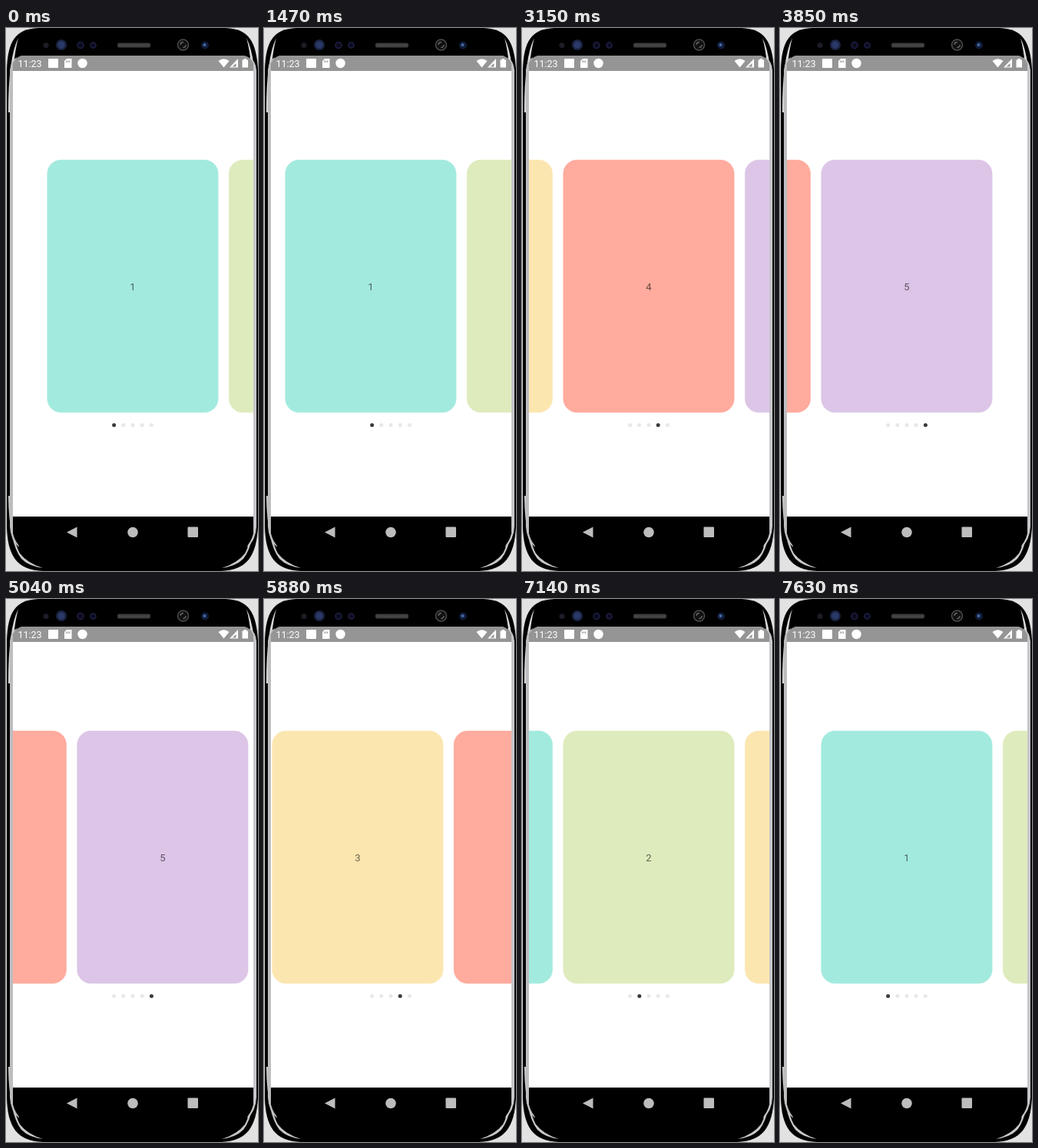
These frames come from a looping animation (328x708 px, 8820 ms). An HTML page:

```html
<!DOCTYPE html>
<html lang="en">
<head>
<meta charset="utf-8">
<title>Card carousel</title>
<style>
  html, body { margin: 0; width: 100%; height: 100%; overflow: hidden; background: #e2e2e2; }
  svg { display: block; width: 328px; height: 708px; font: 13px Roboto, sans-serif; }
</style>
</head>
<body>
<svg viewBox="0 0 328 708">
  <defs>
    <clipPath id="screen"><rect x="9" y="56" width="313" height="581"/></clipPath>
    <filter id="soft"><feGaussianBlur stdDeviation=".7"/></filter>
    <!-- glossy edge of one side, mirrored for the other -->
    <g id="gloss" filter="url(#soft)">
      <path d="M3 110Q3 38 16 13Q8 42 6 110Z" fill="#d8d8d8"/>
      <path d="M3 610Q4 672 20 692Q30 702 48 704Q28 698 18 685Q8 668 6 610Z" fill="#c8c8c8"/>
    </g>
  </defs>

  <!-- phone body -->
  <path d="M1 55C2 18 12 1 42 0H286C316 1 326 18 328 55V650C326 688 314 707 280 708H48C14 707 2 688 1 650Z"/>
  <use href="#gloss"/>
  <use href="#gloss" transform="translate(329) scale(-1 1)"/>
  <path d="M5 55Q6 43 14 38L9 56V637L17 677Q6 668 5 650Z" fill="#bdbdc0"/>
  <path d="M326 55Q325 43 317 38L322 56V637L314 677Q325 668 326 650Z" fill="#c6c6ca"/>
  <path d="M9 637H322V659Q319 671 311 678H20Q12 671 9 659Z"/>

  <!-- sensors and speaker -->
  <g stroke-width="1.500">
    <circle cx="52" cy="22.500" r="3.500" fill="#1c1c26"/>
    <circle cx="72" cy="22" r="7" fill="#1b2444"/>
    <circle cx="72" cy="22" r="4.500" fill="#2b3968"/>
    <circle cx="97" cy="22.500" r="4" fill="#0b0b1c" stroke="#20204a"/>
    <circle cx="113.500" cy="22.500" r="3.500" fill="#0b0b1c" stroke="#20204a"/>
    <rect x="145" y="19.500" width="43" height="6" rx="2" fill="#3c3c3c"/>
    <path d="M147 22.500H186" stroke="#555" stroke-dasharray="1 1"/>
    <circle cx="230.500" cy="22" r="7" fill="#111" stroke="#4c4c4c"/>
    <circle cx="230.500" cy="22" r="3.500" fill="#111" stroke="#666" stroke-dasharray="5.500"/>
    <circle cx="259" cy="22.500" r="5" fill="#101c38"/>
    <circle cx="258.500" cy="22" r="2" fill="#4669a6"/>
  </g>

  <!-- status bar -->
  <path d="M9 56V46Q13 38 20 36H311Q318 38 322 46V56Z" fill="#959595"/>
  <g fill="#fff">
    <text x="15.500" y="50.500" font-size="12.500">11:23</text>
    <rect x="55" y="40" width="13" height="12" rx="1"/>
    <path d="M79 40H85.500V52H76V43Z"/>
    <path d="M78.500 42.500V45M80.500 42.500V45M82.500 42.500V45" stroke="#959595"/>
    <circle cx="99.500" cy="46" r="6.200"/>
    <path d="M276.500 43Q283.500 37.500 290.500 43L283.500 51.500Z"/>
    <path d="M302 40V51.500H291Z"/>
    <path d="M299.500 46V50.500H294.500Z" fill="#959595"/>
    <path d="M307.500 41.500H309.500V40H313V41.500H315V51.500H307.500Z"/>
  </g>

  <!-- carousel -->
  <g clip-path="url(#screen)">
    <rect x="9" y="56" width="313" height="581" fill="#fff"/>
    <g id="cards" text-anchor="middle"></g>
    <g id="dots"></g>
  </g>

  <!-- navigation bar -->
  <g fill="#bdbdbd">
    <path d="M79 657.500L92.500 650.500V664.500Z"/>
    <circle cx="165" cy="657.500" r="6.800"/>
    <rect x="236.500" y="650.500" width="13.500" height="13.500" rx="1"/>
  </g>
</svg>
<script>
const LOOP = 8820, STEP = 70, PITCH = 236.5;
const colors = ['#a3eade', '#deebbd', '#fce6b0', '#ffab9d', '#dcc5e7'];
// start, end, destination page
const swipes = [
  [1330, 2170, 1], [2208, 2450, 2], [2800, 3150, 3], [3570, 3850, 4],
  [4970, 5320, 3], [5670, 6090, 2], [6370, 6930, 1], [7140, 7630, 0]
];
const cards = document.getElementById('cards');
const dots = document.getElementById('dots');

cards.innerHTML = colors.map((color, i) => `<g transform="translate(${i * PITCH})">
  <rect x="53.7" y="172" width="222.500" height="329.300" rx="18"
    fill="${color}" stroke="${color}" stroke-opacity=".4"/>
  <text x="165" y="342" fill="#000" fill-opacity=".58">${i + 1}</text></g>`).join('');
dots.innerHTML = colors.map((_, i) =>
  `<circle cx="${140.6 + i * 12.2}" cy="517.8" r="2.500"/>`).join('');

// Quick drag followed by a decelerating snap
const fling = p => 1 - (1 - p ** 2.35) ** 7.8;

function draw(now) {
  const t = Math.floor(now % LOOP / STEP) * STEP;
  let page = 0, active = 0;
  for (const [start, end, to] of swipes) {
    if (t < start) break;
    const p = Math.min(1, (t - start) / (end - start));
    page = active + (to - active) * fling(p);
    if (p < 1) break;
    active = to;
  }
  cards.setAttribute('transform', `translate(${-page * PITCH})`);
  [...dots.children].forEach((dot, i) =>
    dot.setAttribute('fill', i === active ? '#3a3a3a' : '#e8e8e8'));
}

let origin;
function tick(now) {
  origin ??= now;
  draw(now - origin);
  requestAnimationFrame(tick);
}
draw(0);
requestAnimationFrame(tick);
</script>
</body>
</html>
```
